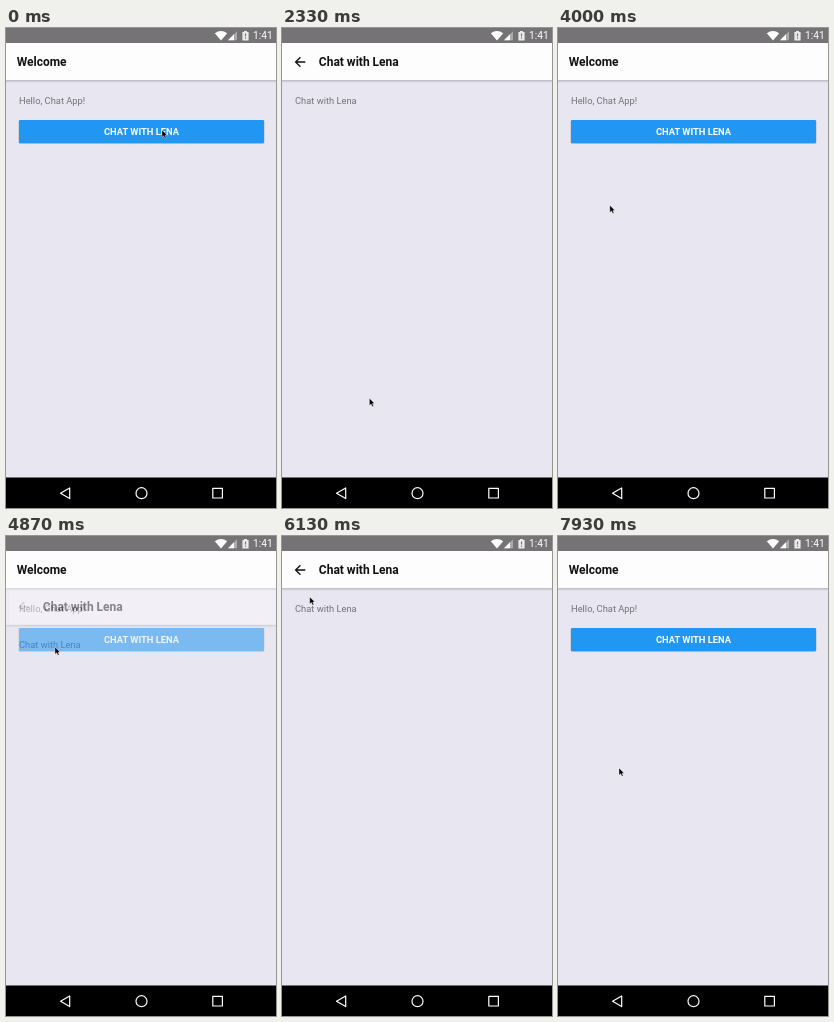
Animation of 270x480 px, one loop 7.99 s. Source, as an HTML page:

```html
<!DOCTYPE html>
<html lang="en">
<head>
<meta charset="utf-8">
<title>Chat navigation</title>
<style>
  html, body { margin: 0; width: 100%; height: 100%; overflow: hidden; background: #e8e6f0; }
  svg { display: block; width: 100%; height: 100%; }
  text { font-family: Roboto, "Noto Sans", sans-serif; }
  .title { font-size: 12px; font-weight: 600; fill: #111; }
  .body { font-size: 9.33px; fill: #737278; }
  .label { font-size: 9.33px; font-weight: 600; fill: #fff; text-anchor: middle; }
  .clock { font-size: 10.2px; fill: #fff; }
</style>
</head>
<body>
<svg viewBox="0 0 270 480">
  <defs>
    <linearGradient id="shade" x2="0" y2="1">
      <stop stop-color="#000" stop-opacity=".2"/>
      <stop offset="1" stop-color="#000" stop-opacity="0"/>
    </linearGradient>
    <clipPath id="buttonClip"><rect x="13" y="92" width="245" height="23" rx="1.3"/></clipPath>
    <g id="page">
      <rect y="15" width="270" height="435" fill="#e8e6f0"/>
      <rect y="52" width="270" height="3" fill="url(#shade)"/>
      <rect y="15" width="270" height="37" fill="#fefdfe"/>
    </g>
  </defs>

  <g id="welcome">
    <use href="#page"/>
    <text class="title" x="10.7" y="38.2">Welcome</text>
    <text class="body" x="13" y="75.5">Hello, Chat App!</text>
    <rect x="12.4" y="92" width="246.2" height="24" rx="2" fill="#000" opacity=".12"/>
    <rect x="12.8" y="92.5" width="245.4" height="23.3" rx="1.6" fill="#000" opacity=".15"/>
    <rect x="13" y="92" width="245" height="23" rx="1.3" fill="#2196f3"/>
    <circle id="ripple" clip-path="url(#buttonClip)"/>
    <text class="label" x="135.5" y="106.9">CHAT WITH LENA</text>
  </g>

  <g id="card">
    <use href="#page"/>
    <rect id="edge" x="2" y="16" width="266" height="36" fill="none" stroke="#000"/>
    <path id="arrow" d="M23.3 34H13.8M18.4 29.2L13.6 34l4.8 4.8" fill="none" stroke="#111" stroke-width="1.35"/>
    <text class="title" x="36.8" y="38.2">Chat with Lena</text>
    <text class="body" x="13" y="75.5">Chat with Lena</text>
  </g>

  <g id="status">
    <rect width="270" height="15" fill="#757375"/>
    <path d="M208.8 5.2Q215 .8 221.2 5.2L215 12.4z" fill="#fff"/>
    <path d="M231 3.2V12.2H222z" fill="#fff" opacity=".4"/>
    <path d="M228 6.2V12.2H222z" fill="#fff"/>
    <path d="M238 3h3v1h1.6v8.4h-6.2V4h1.6z" fill="#fff" opacity=".85"/>
    <path d="M239.5 5.4v3.2M239.5 9.6v1.2" stroke="#757375" stroke-width="1.1"/>
    <text class="clock" x="247" y="11.4">1:41</text>
  </g>

  <g id="nav">
    <rect y="449.5" width="270" height="30.5"/>
    <rect id="press" fill="#262626"/>
    <g fill="none" stroke="#fff" stroke-width="1.2" stroke-linejoin="round">
      <path d="M63.7 460v10.6L54.5 465.3z"/>
      <circle cx="135.5" cy="465.2" r="5.5"/>
      <rect x="206.8" y="460.4" width="9.6" height="9.6"/>
    </g>
  </g>

  <path id="cursor" d="M0 0V7.2L1.7 5.7L2.9 8.3L4.1 7.7L3 5.2H5.1z" fill="#000" stroke="#fff" stroke-width=".5" stroke-opacity=".75"/>
</svg>

<script>
const LOOP = 7990, STEP = 1000 / 15, RISE = 37.3;
const el = id => document.getElementById(id);
const [card, edge, arrow, ripple, press, cursor] =
  ["card", "edge", "arrow", "ripple", "press", "cursor"].map(el);

const clamp = v => Math.min(1, Math.max(0, v));
const span = (t, start, length) => clamp((t - start) / length);
const smooth = u => u * u * (3 - 2 * u);
const easeOut = u => 1 - (1 - u) ** 1.65;
const set = (node, attrs) => {
  for (const name in attrs) node.setAttribute(name, attrs[name]);
};

// each visit to the chat page: opening and closing start
const visits = [{ open: 532.5, close: 2930 }, { open: 4865.8, close: 7145 }];
const OPEN_MS = 350, CLOSE_MS = 340;

// pointer stops: time, x, y, easing towards the stop
const stops = [
  [0, 156, 102],
  [1690, 156, 102],
  [2650, 64, 462],
  [3290, 64, 462],
  [4273, 49, 111],
  [5760, 49, 111],
  [6500, 18, 38, easeOut],
  [7750, 18, 38],
  [7930, 61, 232]
];

function pointerAt(t) {
  const i = stops.findIndex(s => s[0] > t);
  if (i < 0) return stops[stops.length - 1].slice(1, 3);
  const a = stops[i - 1], b = stops[i];
  const u = (b[3] || smooth)(span(t, a[0], b[0] - a[0]));
  return [a[1] + (b[1] - a[1]) * u, a[2] + (b[2] - a[2]) * u];
}

function drawCard(t) {
  const visit = visits.find(v => t >= v.open && t < v.close + CLOSE_MS);
  card.style.display = visit ? "" : "none";
  if (!visit) return;
  const closing = t >= visit.close;
  const away = closing
    ? span(t, visit.close, CLOSE_MS)
    : (1 - span(t, visit.open, OPEN_MS)) ** 5;
  const tapped = 1 - 0.8 * span(t, 6540, 120);
  set(card, { transform: `translate(0 ${away * RISE})`, opacity: 1 - 0.55 * away });
  set(edge, { opacity: 0.06 * clamp(away * 2) });
  set(arrow, { opacity: closing ? tapped : Math.min(tapped, 1 - 0.7 * away) });
}

function drawRipple(t) {
  const visit = visits.find(v => t > v.open - 500 && t < v.open);
  const u = visit ? span(t, visit.open - 500, 500) : 0;
  const [x, y] = pointerAt(t);
  set(ripple, { cx: x, cy: y, r: 20 + 240 * u, opacity: visit ? 0.1 * (1 - u) : 0 });
}

function drawPress(t) {
  const u = smooth(span(t, 2700, 300));
  const w = 72 * u, h = 30 * u;
  set(press, {
    x: 59 - w / 2, y: 465 - h / 2, width: w, height: h, rx: h / 2,
    opacity: t > 2700 && t < 3260 ? 1 : 0
  });
}

function draw(now) {
  const t = Math.floor((now % LOOP + 4) / STEP) * STEP;
  drawCard(t);
  drawRipple(t);
  drawPress(t);
  set(cursor, { transform: `translate(${pointerAt(t)})` });
}

const begin = performance.now();
function tick() {
  draw(performance.now() - begin);
  requestAnimationFrame(tick);
}
tick();
</script>
</body>
</html>
```
